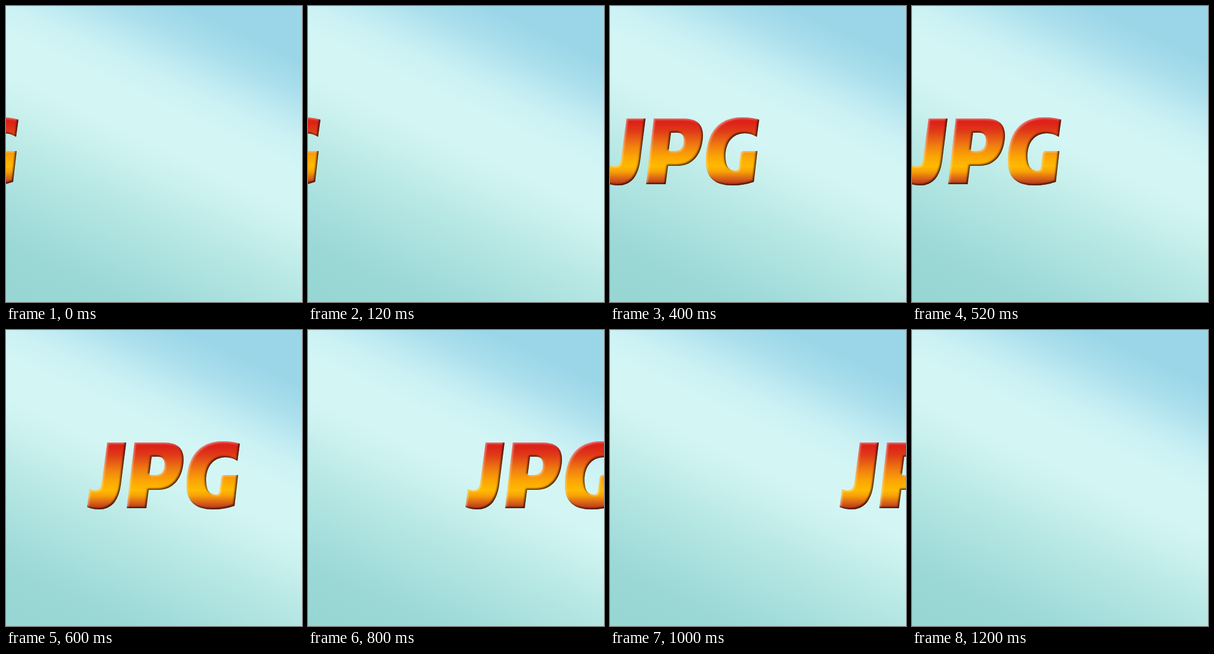
Animation of 500x500 px, one loop 1.4 s. Source, as an HTML page:

```html
<!DOCTYPE html>
<html lang="en">
<head>
<meta charset="utf-8">
<title>JPG</title>
<style>
  html, body { margin: 0; height: 100%; overflow: hidden; background: #d3f6f5; }
  svg { display: block; width: 100vw; height: 100vh; }
</style>
</head>
<body>
<svg viewBox="0 0 500 500" role="img" aria-label="JPG">
  <defs>
    <linearGradient id="sky" gradientUnits="userSpaceOnUse" x1="77" y1="-163.8" x2="-192.5" y2="409.5">
      <stop offset=".086" stop-color="#9bd6e8"/>
      <stop offset=".164" stop-color="#abdfec"/>
      <stop offset=".236" stop-color="#c0ebf2"/>
      <stop offset=".286" stop-color="#ccf2f4"/>
      <stop offset=".357" stop-color="#d3f6f5"/>
      <stop offset=".443" stop-color="#d3f6f5"/>
      <stop offset=".521" stop-color="#caf1ee"/>
      <stop offset=".586" stop-color="#bfebe8"/>
      <stop offset=".664" stop-color="#b3e6e2"/>
      <stop offset=".757" stop-color="#a7dfdd"/>
      <stop offset=".857" stop-color="#9bd8d6"/>
      <stop offset="1" stop-color="#97d6d3"/>
    </linearGradient>
    <linearGradient id="fire" gradientUnits="userSpaceOnUse" x1="0" y1="188" x2="0" y2="303">
      <stop offset=".08" stop-color="#dd2218"/>
      <stop offset=".2" stop-color="#e03a18"/>
      <stop offset=".42" stop-color="#f07f10"/>
      <stop offset=".58" stop-color="#fca504"/>
      <stop offset=".72" stop-color="#ffba00"/>
      <stop offset=".8" stop-color="#f8a006"/>
      <stop offset=".9" stop-color="#d96218"/>
      <stop offset="1" stop-color="#b0301c"/>
    </linearGradient>
    <filter id="bevel" filterUnits="userSpaceOnUse" x="120" y="175" width="290" height="140" color-interpolation-filters="sRGB">
      <feGaussianBlur in="SourceAlpha" stdDeviation="1.6" result="soft"/>
      <feOffset in="soft" dx="1.6" dy="1.8" result="low"/>
      <feFlood flood-color="#fff" flood-opacity=".42"/>
      <feComposite in2="low" operator="out"/>
      <feComposite in2="SourceAlpha" operator="in" result="light"/>
      <feOffset in="soft" dx="-1.8" dy="-1.8" result="high"/>
      <feFlood flood-color="#2a0a00" flood-opacity=".85"/>
      <feComposite in2="high" operator="out"/>
      <feComposite in2="SourceAlpha" operator="in" result="dark"/>
      <feMerge>
        <feMergeNode in="SourceGraphic"/>
        <feMergeNode in="light"/>
        <feMergeNode in="dark"/>
      </feMerge>
    </filter>
  </defs>
  <rect width="500" height="500" fill="url(#sky)"/>
  <g id="word">
    <g fill="url(#fire)" fill-rule="evenodd" filter="url(#bevel)">
      <path d="M171 190H203L194 261C190 290 177 303 157 303Q146 303 137 299L141 269Q145 271 149 271C157 271 161 267 162 258Z"/>
      <path d="M217 190H266C291 190 300 201 300 219C299 250 283 270 257 270H241L237 301H204ZM246 214L242 245H252C263 245 268 238 268 227C268 218 264 214 257 214Z"/>
      <path d="M395 192L391 221Q382 215 371 215C350 215 338 231 338 254C338 269 343 278 353 278H356Q361 277 361 271L364 249Q365 245 369 245H392L386 297Q369 303 350 303C320 303 305 290 305 262C305 216 325 188 366 188Q383 188 395 192Z"/>
    </g>
  </g>
</svg>
<script>
  const shifts = [-374, -268, -143, 0, 129, 251, 380];
  const hold = 200;
  const frames = [...shifts, shifts.at(-1)].map((x, i) => ({
    transform: `translateX(${x}px)`,
    offset: i / shifts.length,
    easing: 'steps(1, end)'
  }));
  document.getElementById('word').animate(frames, {
    duration: hold * shifts.length,
    iterations: Infinity
  });
</script>
</body>
</html>
```
